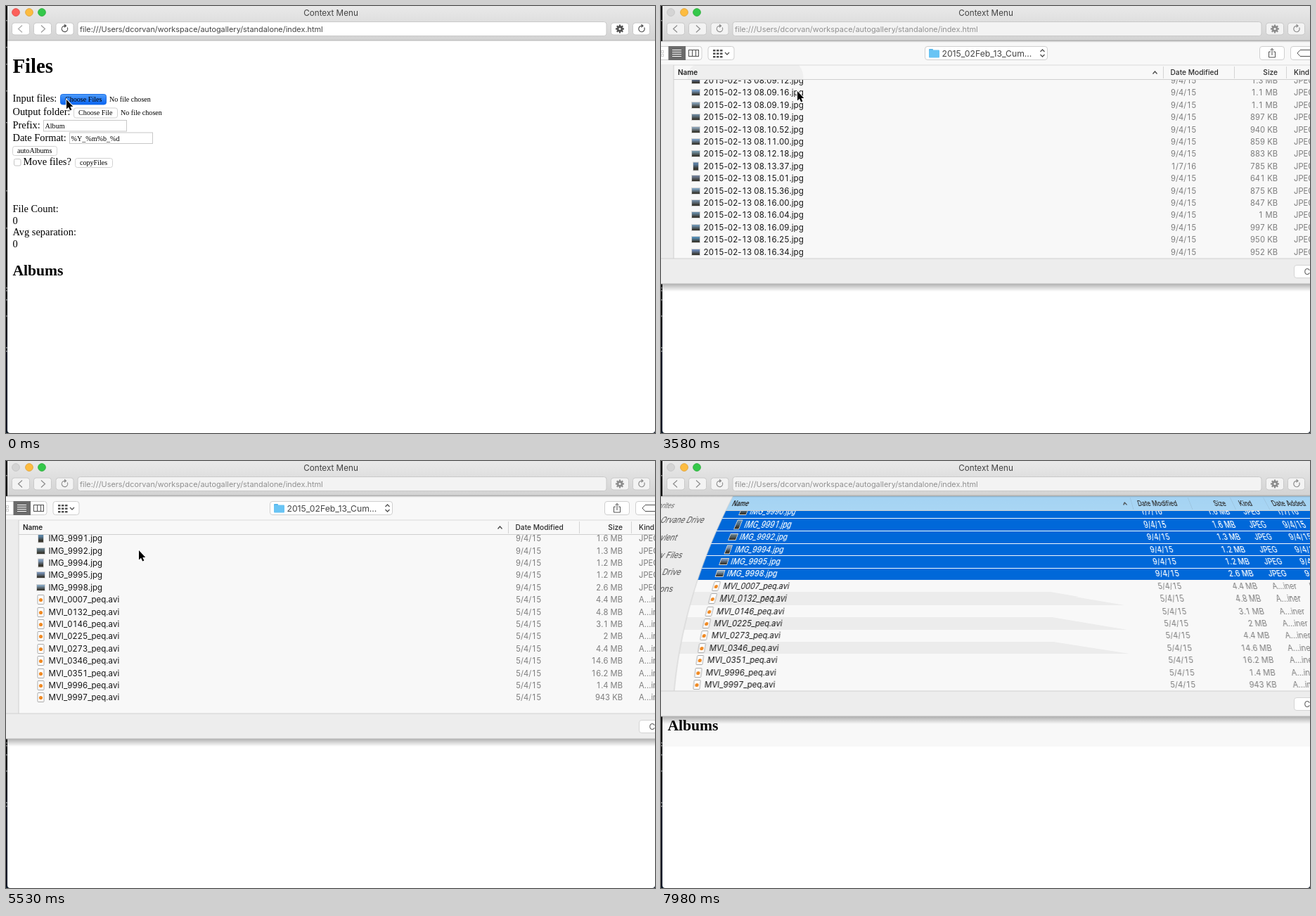
Write an HTML page with a canvas that moves like this. It is 923 px wide and 607 px high and loops after 8000 ms.

```html
<!DOCTYPE html>
<html lang="en">
<head>
<meta charset="utf-8">
<title>Context Menu</title>
<style>
html, body { margin: 0; width: 100%; height: 100%; overflow: hidden; background: #fff; }
canvas { display: block; }
</style>
</head>
<body>
<canvas id="stage" width="923" height="607"></canvas>
<script>
const W = 923, H = 607, LOOP = 8000, ROW = 17.4, PAD = 200, MID = 462;
const screen2d = document.getElementById('stage').getContext('2d');
const sheet = document.createElement('canvas');
sheet.width = W + PAD * 2;
sheet.height = 396;
const sheet2d = sheet.getContext('2d');
sheet2d.translate(PAD, 0);
let c = screen2d;

const SANS = 'Inter, Roboto, sans-serif', SERIF = '"Liberation Serif", "Noto Serif", serif';

// ---------- drawing helpers ----------
function rect(x, y, w, h, fill) { c.fillStyle = fill; c.fillRect(x, y, w, h); }

function box(x, y, w, h, r, fill, edge) {
  c.beginPath();
  c.roundRect(x, y, w, h, r);
  c.fillStyle = fill;
  c.fill();
  if (edge) { c.strokeStyle = edge; c.lineWidth = 1; c.stroke(); }
}

function text(s, x, y, size, color = '#111', weight = 400, family = SANS, align = 'left') {
  c.font = `${weight} ${size}px ${family}`;
  c.textAlign = align;
  c.fillStyle = color;
  c.fillText(s, x, y);
}

// Text whose figures all take the same width
function tabular(s, x, y, size, color, weight, align = 'left') {
  c.font = `${weight} ${size}px ${SANS}`;
  c.textAlign = 'center';
  c.fillStyle = color;
  const widths = [...s].map(ch => c.measureText(/\d/.test(ch) ? '0' : ch).width);
  if (align === 'right') x -= widths.reduce((a, b) => a + b);
  widths.forEach((w, i) => {
    c.fillText(s[i], x + w / 2, y);
    x += w;
  });
}

function serif(s, x, y, size = 14.4, weight = 400) { text(s, x, y, size, '#000', weight, SERIF); }

function line(points, color, width = 1) {
  c.beginPath();
  points.forEach(([x, y]) => c.lineTo(x, y));
  c.strokeStyle = color;
  c.lineWidth = width;
  c.stroke();
}

function dot(x, y, r, fill, edge) {
  c.beginPath();
  c.arc(x, y, r, 0, 7);
  c.fillStyle = fill;
  c.fill();
  if (edge) { c.strokeStyle = edge; c.lineWidth = .8; c.stroke(); }
}

function fade(y0, y1, from, to) {
  const g = c.createLinearGradient(0, y0, 0, y1);
  g.addColorStop(0, from);
  g.addColorStop(1, to);
  return g;
}

// Linear interpolation over keys [step, ...values]
function at(keys, k) {
  let i = 0;
  while (i < keys.length - 2 && k >= keys[i + 1][0]) i++;
  const [a, b] = [keys[i], keys[i + 1]];
  const u = Math.min(1, Math.max(0, (k - a[0]) / (b[0] - a[0])));
  return a.slice(1).map((v, j) => v + (b[j + 1] - v) * u);
}

// ---------- file list ----------
let seed = 7;
const random = () => (seed = seed * 16807 % 2147483647) / 2147483647;
const rows = [];

// Items read "name=size"; a star marks the later date, a bar a portrait picture
function add(prefix, ext, items) {
  for (const item of items.split(' ')) {
    const [id, size = (1 + random() * 1.4).toFixed(1)] = item.replace(/[*|]/g, '').split('=');
    const video = ext === '_peq.avi';
    rows.push({
      name: prefix + id + ext, video,
      size: size + (size < 100 ? ' MB' : ' KB'),
      date: video ? '5/4/15' : item.includes('*') ? '1/7/16' : '9/4/15',
      tall: item.includes('|'),
      sky: `hsl(${200 + random() * 20} ${15 + random() * 30}% ${45 + random() * 20}%)`
    });
  }
}
function series(from, to, step) {
  const out = [];
  for (let n = from; n <= to; n += step) out.push(String(n).padStart(4, '0'));
  return out.join(' ');
}
const DAY = '2015-02-13 08.';
add(DAY, '.jpg', '03.11 04.26 05.40 06.02 07.15 08.51 09.12=1.3 09.16=1.1 09.19=1.1 10.19=897 10.52=940 11.00=859 12.18=883');
add(DAY, '.jpg', '13.37*|=785 15.01=641 15.36=875 16.00=847 16.04=1 16.09=997 16.25=950 16.34=952 17.05 18.22 19.40');
add('IMG_', '.jpg', series(5, 61, 2));
add('IMG_', '.jpg', '0063=1.4 0065=2.1 0066=2.2 0067=1.1 0068=1.6 0069=1.5 0070=1.5 0072=1.3 0073=1.5 0074=2.3 0075*=1.5 0077=1.8 0079=1.2 0081=1.3 0082=1.4');
add('IMG_', '.jpg', series(84, 120, 2));
add('IMG_', '.jpg', series(9940, 9988, 3));
add('IMG_', '.jpg', '9990*=1.6 9991|=1.6 9992=1.3 9994|=1.2 9995=1.2 9998=2.6');
add('MVI_', '_peq.avi', '0007=4.4 0132=4.8 0146=3.1 0225=2 0273=4.4 0346=14.6 0351=16.2 9996=1.4 9997=943');

const indexOf = part => rows.findIndex(r => r.name.includes(part));
const scrollFor = (part, y) => 113.5 + ROW * indexOf(part) - y;
const lastPhoto = indexOf('9998.'), end = scrollFor('9997', 349.9);

const scrollKeys = [[23, 0], [24, scrollFor('09.12', 105.9)], [29, scrollFor('0063', 109.5)],
  [35, end + 13.5], [37, end + 13.5], [39, end]];
const cursorKeys = [[3, 86, 133], [7, 262, 151], [10, 262, 151], [13, 891, 158], [15, 500, 94],
  [17, 176, 118], [18, 194, 121], [36, 194, 121], [37, 189, 127], [40, 189, 127],
  [43, 124, 197], [44, 124, 197], [45, 644, 302]];
// Upward shift of the sheet and strength of its narrowing
const sheetKeys = [[3, 345, 1.8], [4, 230, 1.6], [5, 100, 1.2], [6, 22, .7], [7, 0, 0],
  [51, 0, 0], [52, 6, .3], [53, 32, 1]];

function stepAt(t) {
  return t >= 7980 ? 53 : Math.min(52, Math.floor((t + 10) / 149.3));
}

// ---------- browser window ----------
function reloadIcon(x, y, color) {
  c.beginPath();
  c.arc(x, y + .5, 4.2, -.5, 4.6);
  c.strokeStyle = color;
  c.lineWidth = 1.2;
  c.stroke();
  c.beginPath();
  c.moveTo(x - .5, y - 6.5); c.lineTo(x + 3, y - 3.7); c.lineTo(x - .5, y - 1);
  c.fillStyle = color;
  c.fill();
}

function gearIcon(x, y, color) {
  for (let a = 0; a < 4; a++) {
    const dx = Math.cos(a * Math.PI / 4) * 6, dy = Math.sin(a * Math.PI / 4) * 6;
    line([[x - dx, y - dy], [x + dx, y + dy]], color, 2.2);
  }
  dot(x, y, 4.4, color);
  dot(x, y, 1.6, '#f6f6f6');
}

function browserBar(active) {
  const fill = active ? '#fff' : '#f3f3f3', ink = active ? '#505050' : '#8c8c8c';
  rect(2, 0, W - 2, 49, fade(0, 49, '#e9e9e9', '#d3d3d3'));
  rect(2, 48.5, W - 2, 1, '#b4b4b4');
  dot(14, 9, 5.4, active ? '#fc605b' : '#d4d4d4', active ? '#df4744' : '#c2c2c2');
  dot(33, 9, 5.4, '#fdbc40', '#de9f34');
  dot(51, 9, 5.4, '#34c84a', '#27aa35');
  text('Context Menu', MID, 13.5, 11.7, '#444', 400, SANS, 'center');
  for (const [x, w] of [[8.5, 25], [39.5, 25], [71, 25], [102, 752], [860.5, 25], [891.5, 24]]) {
    const h = w > 100 ? 20 : 17;
    box(x, 32.5 - h / 2, w, h, 3.5, fill, '#c9c9c9');
  }
  line([[23, 27.5], [17.5, 32.5], [23, 37.5]], active ? '#aaa' : '#8c8c8c', 1.2);
  line([[50, 27.5], [55.5, 32.5], [50, 37.5]], active ? '#999' : '#8c8c8c', 1.2);
  reloadIcon(83.5, 32, ink);
  reloadIcon(904, 32, ink);
  gearIcon(873, 32.5, ink);
  text('file:///Users/dcorvan/workspace/autogallery/standalone/index.html', 105, 36.5, 10.9, active ? '#444' : '#909090');
}

function button(label, x, y, w, h, pressed) {
  box(x, y, w, h, 3, pressed ? fade(y, y + h, '#4f9dfb', '#0763f3') : '#fff', pressed ? '#1d6fe6' : '#d2d2d2');
  serif(label, x + 6.5, y + h - 4, 10.1);
}

function field(value, x, y) {
  rect(x, y, 119, 16.5, '#c8c8c8');
  rect(x + 1, y + 1, 117, 14.5, '#fff');
  serif(value, x + 2.5, y + 12, 10.1);
}

function albumsTitle() { serif('Albums', 9.5, 383, 21.6, 700); }

function page(pressed) {
  serif('Files', 9.5, 95, 28.8, 700);
  serif('Input files:', 9.5, 136);
  button('Choose Files', 77.5, 125.5, 65, 14.5, pressed);
  serif('No file chosen', 147, 136, 10.1);
  serif('Output folder:', 9.5, 155);
  button('Choose File', 96.5, 145, 62, 14, false);
  serif('No file chosen', 163, 155, 10.1);
  serif('Prefix:', 9.5, 174);
  field('Album', 53, 162);
  serif('Date Format:', 9.5, 191.5);
  field('%Y_%m%b_%d', 90, 179.5);
  button('autoAlbums', 9.5, 199.5, 63, 13, false);
  box(11.5, 217.5, 9.5, 9.5, 2, '#fff', '#c4c4c4');
  serif('Move files?', 24.5, 226);
  button('copyFiles', 98.5, 216.5, 53, 13, false);
  serif('File Count:', 9.5, 293);
  serif('0', 9.5, 309.5);
  serif('Avg separation:', 9.5, 326);
  serif('0', 9.5, 342.5);
  albumsTitle();
}

function desktopEdge() {
  rect(0, 0, 2, H, fade(380, 500, '#050505', '#0c1826'));
  for (const y of [20, 58, 82, 120, 165, 262, 315, 400, 404, 417, 440, 485, 490]) rect(0, y, 1.5, 1.5, '#aaa');
}

// ---------- file sheet ----------
function rowIcon(r, y) {
  if (r.video) {
    box(45, y - 6.5, 9, 13, 1, '#fff', '#aaa');
    dot(49.5, y + .5, 2.6, '#f08a24');
    return;
  }
  const w = r.tall ? 9 : 13, h = r.tall ? 13 : 10, x = 49.5 - w / 2;
  rect(x, y - h / 2, w, h, '#d6d6d6');
  rect(x + 1, y - h / 2 + 1, w - 2, h - 2, fade(y - 3, y + 3, r.sky, '#38362e'));
}

function fileList(k) {
  const [scroll] = at(scrollKeys, k);
  c.save();
  c.beginPath();
  c.rect(18, 105, 1086, 254);
  c.clip();
  rows.forEach((r, i) => {
    const y = 113.5 + ROW * i - scroll;
    if (y < 90 || y > 372) return;
    const top = Math.round(y - ROW / 2), bottom = Math.round(y + ROW / 2);
    const selected = k >= 43 ? i <= lastPhoto : k >= 20 && i === 0;
    const odd = (i - lastPhoto) % 2 === 0;
    if (selected) {
      rect(18, top, 1086, bottom - top, '#0068d9');
      rect(18, top, 1086, 1, '#f2f7fc');
    }
    if (r.video && k >= 45 && top < 320) {
      if (k < 52) {
        rect(156, top, 500, Math.min(bottom, 321) - top, odd ? '#f3f3f3' : '#fff');
      } else if (odd) {
        c.beginPath();
        c.moveTo(18, top); c.lineTo(560, top); c.lineTo(670, bottom); c.lineTo(18, bottom);
        c.fillStyle = '#ececec';
        c.fill();
      }
    }
    rowIcon(r, Math.round(y));
    const weight = selected ? 500 : 400, ink = selected ? '#fff' : '#7d7d7d', base = Math.round(y + 4);
    tabular(r.name, 60.5, base, 11.5, selected ? '#fff' : '#151515', weight);
    tabular(r.date, 725, base, 11.2, ink, weight);
    tabular(r.size, 877, base, 11.2, ink, weight, 'right');
    text(r.video ? 'A...iner' : 'JPEG', 900, base, 11.2, ink, weight);
    tabular(r.date, 957, base, 11.2, ink, weight);
  });
  c.restore();
}

function toolbar(on) {
  const ink = on ? '#505050' : '#a0a0a0', edge = on ? '#cfcfcf' : '#e2e2e2', fill = on ? '#fff' : '#f9f9f9';
  box(-18, 57.5, 76, 19, 3.5, fill, edge);
  for (const y of [63, 68]) for (const x of [-5, 0]) c.strokeRect(x + .5, y + .5, 3, 3);
  rect(10.5, 57, 24.5, 20, on ? '#6b6b6b' : '#dedede');
  for (let y = 62; y < 74; y += 3) rect(16, y, 13, 1, on ? '#fff' : '#777');
  c.strokeStyle = ink;
  c.strokeRect(39.5, 62.5, 14, 9);
  rect(44, 62, 1, 10, ink);
  rect(49, 62, 1, 10, ink);
  box(67, 57.5, 37, 19, 3.5, fill, edge);
  for (const y of [62, 66.5, 71]) for (const x of [74, 79, 84]) rect(x, y, 3.5, 2.5, ink);
  line([[91, 66], [94, 69], [97, 66]], ink, 1.3);
  box(375.5, 57.5, 174, 19, 3.5, fill, edge);
  c.globalAlpha = on ? 1 : .75;
  box(381, 61, 6, 4, 1, '#52b4ea');
  box(381, 62.5, 15, 11, 1, '#69c4f4');
  c.globalAlpha = 1;
  text('2015_02Feb_13_Cum...', 399.5, 71.5, 12.2, on ? '#454545' : '#999');
  line([[539.5, 65], [542.5, 62], [545.5, 65]], ink, 1.3);
  line([[539.5, 69], [542.5, 72], [545.5, 69]], ink, 1.3);
  box(851.5, 57.5, 35, 19, 3.5, fill, edge);
  line([[867, 65], [864.5, 65], [864.5, 73], [873.5, 73], [873.5, 65], [871, 65]], ink);
  line([[869, 70], [869, 60.5]], ink);
  line([[866.5, 63], [869, 60.5], [871.5, 63]], ink);
  box(895.5, 57.5, 40, 19, 3.5, fill, edge);
  line([[924, 62.5], [909, 62.5], [905, 67], [909, 71.5], [924, 71.5]], ink);
}

function drawSheet(k) {
  c = sheet2d;
  c.clearRect(-PAD, 0, sheet.width, sheet.height);
  const x0 = -180, w = 1284;
  rect(x0, 50, w, 345, '#f8f8f8');
  if (k >= 43) rect(x0, 50, w, 55, fade(50, 105, '#9dcef1', '#a9d6f4'));
  else if (k >= 20 && k < 24) rect(x0, 59, w, 46, fade(59, 105, '#f8f8f8', '#c8e2f6'));
  else if (k === 24) {
    c.beginPath();
    c.moveTo(38, 105); c.quadraticCurveTo(36, 90, 48, 84); c.lineTo(196, 84); c.quadraticCurveTo(204, 94, 202, 105);
    c.fillStyle = '#efefef';
    c.fill();
  }
  toolbar(k >= 8);
  rect(x0, 83.5, w, 1, k >= 43 ? '#9cc3de' : '#dcdcdc');
  text('Name', 24, 98, 10, '#222', 600);
  line([[699.5, 96.5], [702.5, 93], [705.5, 96.5]], '#444', 1.2);
  text('Date Modified', 724.5, 98, 10.2, '#2b2b2b', 500);
  text('Size', 877, 98, 10.2, '#2b2b2b', 500, SANS, 'right');
  text('Kind', 900, 98, 10.2, '#2b2b2b', 500);
  text('Date Added', 957, 98, 10.2, '#2b2b2b', 500);
  for (const x of [714, 815, 889, 947]) rect(x, 86, 1, 17, k >= 43 ? '#9cc3de' : '#d4d4d4');
  rect(18, 104, w, 1, '#cfcfcf');
  if (k >= 8) fileList(k);

  rect(x0, 84, 198, 275, '#ececec');
  rect(17.5, 84, 1, 275, '#cfcfcf');
  text('Favorites', -119, 101, 10.2, '#777', 500);
  ['Orvane Drive', 'Daylent', 'All My Files', 'Shared Drive', 'Applications']
    .forEach((s, i) => text(s, -83, 122 + i * 24.3, 11.7, '#505050'));
  rect(x0, 359, w, 36, '#ededed');
  rect(x0, 358.5, w, 1, '#d2d2d2');
  box(900.5, 368.5, 70, 18, 3.5, '#fff', '#d4d4d4');
  text('Cancel', 914.5, 382, 12, k >= 8 ? '#606060' : '#aaa');
  c = screen2d;
}

function placeSheet(k) {
  const [shift, narrow] = at(sheetKeys, k), bottom = Math.round(395 - shift);
  if (bottom <= 50) return;
  drawSheet(k);
  if (k === 53) {
    rect(2, bottom, W - 2, 406 - bottom, '#f8f8f8');
    albumsTitle();
  }
  rect(0, bottom, W, 11, fade(bottom, bottom + 11, 'rgba(0,0,0,.3)', 'rgba(0,0,0,0)'));
  // Each line of the sheet narrows, and lifts a little more, towards the top
  for (let y = 50; y < bottom; y++) {
    const d = Math.max(0, 335 - y);
    const s = 1 - narrow * (.000177 * d + 1.709e-6 * d * d);
    const from = Math.round(y + shift + 2 * narrow * (d / 285) ** 2);
    c.drawImage(sheet, 0, from, sheet.width, 1, MID - (MID + PAD) * s, y, sheet.width * s, 1);
  }
  rect(0, bottom - .5, W, 1, '#b8b8b8');
  rect(0, 49, W, 3, fade(49, 52, 'rgba(0,0,0,.22)', 'rgba(0,0,0,0)'));
}

function cursor(k) {
  if (k > 45) return;
  const [x, y] = at(cursorKeys, k);
  c.beginPath();
  for (const [dx, dy] of [[0, 0], [0, 13.5], [3, 10.7], [5.2, 15.6], [7.4, 14.6], [5.3, 9.9], [9.3, 9.9]]) c.lineTo(x + dx, y + dy);
  c.closePath();
  c.strokeStyle = '#fff';
  c.lineWidth = 1.8;
  c.stroke();
  c.fillStyle = '#000';
  c.fill();
}

function draw(t) {
  const k = stepAt(t);
  rect(0, 0, W, H, '#0c1826');
  desktopEdge();
  box(2, 0, W - 2, H, 4, '#fff');
  page(k < 3);
  browserBar(k < 3);
  placeSheet(k);
  cursor(k);
}

const start = performance.now();
function tick() {
  draw((performance.now() - start) % LOOP);
  requestAnimationFrame(tick);
}
tick();
</script>
</body>
</html>
```
